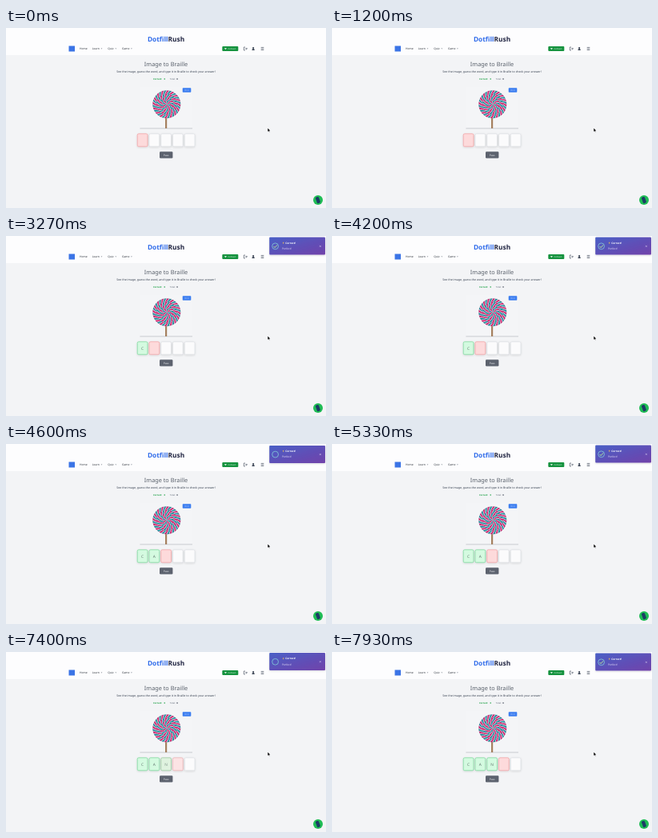
An HTML page for the animation above (8000 ms loop, 400 by 226 pixels).

```html
<!DOCTYPE html>
<html lang="en">
<head>
<meta charset="utf-8">
<title>Image to Braille</title>
<style>
  html, body { margin: 0; width: 100%; height: 100%; overflow: hidden; background: #f3f4f6; }
  svg { display: block; width: 100vw; height: 100vh; }
  text { font-family: "Noto Sans", "Open Sans", sans-serif; text-rendering: geometricPrecision; }
  .mid { text-anchor: middle; }
  .nav { font-size: 3.4px; font-weight: 500; fill: #30363f; }
  .line { fill: none; stroke: #374151; stroke-width: .6; }
</style>
</head>
<body>
<svg viewBox="0 0 400 226">
  <defs>
    <linearGradient id="violet" x1="0" y1="0" x2="1" y2="1">
      <stop offset="0" stop-color="#4a5fc6"/><stop offset="1" stop-color="#7142aa"/>
    </linearGradient>
    <linearGradient id="shade" x1="0" y1="0" x2="0" y2="1">
      <stop offset="0" stop-color="#c3c6cb"/><stop offset="1" stop-color="#f3f4f6"/>
    </linearGradient>
    <filter id="soft" x="-20%" y="-20%" width="140%" height="150%">
      <feDropShadow dx="0" dy=".8" stdDeviation=".8" flood-color="#111827" flood-opacity=".16"/>
    </filter>
  </defs>

  <rect width="400" height="226" fill="#f3f4f6"/>
  <rect width="400" height="34" fill="#fdfdfe"/>
  <text class="mid" x="200" y="16.8" font-size="8.3" font-weight="800" fill="#1f2340"><tspan fill="#2f6bea">Dotfill</tspan>Rush</text>

  <rect x="78.5" y="22.5" width="7.5" height="7" fill="#3b74e6"/>
  <g class="nav">
    <text x="92" y="27.2">Home</text><text x="107.8" y="27.2">Learn</text>
    <text x="127.3" y="27.2">Quiz</text><text x="145" y="27.2">Game</text>
  </g>
  <path d="M118.6 25.5h1.8l-.9 1zM136.4 25.5h1.8l-.9 1zM156 25.5h1.8l-.9 1z" fill="#6b7280"/>
  <rect x="270.3" y="23" width="20" height="6" rx="1" fill="#16933f"/>
  <path d="M272.8 25.2h3.2l-1.6 1.8z" fill="#fff"/>
  <text x="277.4" y="27.1" font-size="2.8" fill="#d5f2de">Contact</text>
  <path class="line" d="M299 24h-1.7v4h1.7M298.8 26h2.6M300.2 24.8l1.2 1.2l-1.2 1.2M318.7 24.4h3.6M318.7 26h3.6M318.7 27.6h3.6"/>
  <path d="M307.4 28.1q0-2 1.7-2t1.7 2z" fill="#374151"/>
  <circle cx="309.1" cy="25" r="1.1" fill="#374151"/>

  <text class="mid" x="200" y="47.6" font-size="7.3" fill="#5a616c">Image to Braille</text>
  <text class="mid" x="200" y="56.4" font-size="3.55" fill="#374151">See the image, guess the word, and type it in Braille to check your answer!</text>
  <g font-size="2.8" font-weight="600">
    <text x="184" y="65.2" fill="#22a34a">Correct:</text><text x="197.5" y="65.2" fill="#22a34a">0</text>
    <text x="204.8" y="65.2" font-weight="400" fill="#6b7280">Total:</text><text x="213.3" y="65.2" fill="#374151">0</text>
  </g>

  <rect x="167" y="74" width="66" height="52" rx="1" fill="#f4f5f7"/>
  <rect x="167.4" y="125.6" width="65.6" height="1.8" fill="url(#shade)"/>
  <rect x="199" y="110" width="2.2" height="16" fill="#a5805f"/>
  <g id="candy" transform="translate(200.8 95.8)"></g>
  <rect x="220.7" y="75.2" width="10.6" height="5.6" rx=".7" fill="#3b7df0"/>
  <text class="mid" x="226" y="79" font-size="2.7" fill="#c6daff">Hint</text>

  <g id="cells"></g>
  <rect x="192" y="155.3" width="16.4" height="8.2" rx="1.2" fill="#5c626e"/>
  <text class="mid" x="200.2" y="160.6" font-size="3.3" fill="#e8eaee">Pass</text>

  <circle cx="390" cy="216" r="6" fill="#1fbd55"/>
  <rect x="387.8" y="212" width="4.2" height="8" rx="1.4" fill="#1d3b66" transform="rotate(-20 390 216)"/>
  <path d="M327.2 126v4l1-.9l.7 1.5l.7-.3l-.7-1.5h1.3z" fill="#111"/>

  <g id="toast">
    <rect x="329.2" y="1.6" width="69.8" height="22" rx="1" fill="url(#violet)" filter="url(#soft)"/>
    <circle cx="336.6" cy="12.8" r="3.9" fill="none" stroke="#7fc0d6" stroke-width=".9"/>
    <path id="tick" d="M334.6 13l1.5 1.6l2.9-3.3" pathLength="1" fill="none" stroke="#b5e79a" stroke-width="1"/>
    <path d="M347.2 7.2l-1.6 1.6h1l-.6 1.4l1.8-1.8h-1z" fill="#f9c74f"/>
    <text x="349.3" y="9.8" font-size="3.2" font-weight="600" fill="#fff">Correct!</text>
    <text x="345" y="17.2" font-size="3.3" fill="#dcd8f4">Perfect!</text>
    <path d="M391.8 11.8l2 2m0-2l-2 2" stroke="#ddd6f3" stroke-width=".5"/>
  </g>
</svg>
<script>
const LOOP = 8000;
const HITS = [2470, 4270, 7400];   // a letter is accepted
const LEAD = 110;                  // motion already under way when a hit shows
const HIDE = 2010, HIDE_TIME = 100;
const WORD = "CAN";
const WHITE = [251, 251, 252, 214, 217, 222];   // fill rgb, border rgb
const PINK = [253, 218, 219, 240, 144, 146];
const GREEN = [212, 250, 224, 100, 208, 136];

const $ = id => document.getElementById(id);
const clamp = v => Math.max(0, Math.min(1, v));
const mix = (a, b, p) => a + (b - a) * p;

function add(parent, name, attrs) {
  const el = document.createElementNS("http://www.w3.org/2000/svg", name);
  for (const key in attrs) el.setAttribute(key, attrs[key]);
  return parent.appendChild(el);
}

// Coiled rope: rings of slanted stripes on white.
function drawCandy() {
  const radius = 17.4, rings = 4, colors = ["#d3266f", "#23929f"];
  const point = (r, a) => (r * Math.cos(a)).toFixed(2) + "," + (r * Math.sin(a)).toFixed(2);
  add($("candy"), "circle", { r: radius, fill: "#ece6ef" });
  for (let ring = 0; ring < rings; ring++) {
    const inner = radius * ring / rings, outer = radius * (ring + 1) / rings;
    const count = 8 + 8 * ring, step = 2 * Math.PI / count;
    const width = step * .72, slant = 3.4 / outer;
    for (let i = 0; i < count; i++) {
      const a = i * step + ring * .6;
      const pts = [point(inner, a), point(outer, a + slant),
        point(outer, a + slant + width), point(inner, a + width)];
      add($("candy"), "polygon", { points: pts.join(" "), fill: colors[i % 2] });
    }
    add($("candy"), "circle", {
      r: outer - .2, fill: "none", stroke: "#4b3a68", "stroke-width": .4, opacity: .5
    });
  }
}

const cells = Array.from({ length: 5 }, (_, i) => {
  const x = 164.2 + 14.75 * i;
  const box = add($("cells"), "rect", {
    x, y: 132.8, width: 12.8, height: 16, rx: 1.6, "stroke-width": .6, filter: "url(#soft)"
  });
  const letter = add($("cells"), "text", {
    x: x + 6.4, y: 142.5, class: "mid", "font-size": 4.8, fill: "#62766f"
  });
  letter.textContent = WORD[i] || "";
  return { box, letter };
});

function paintCells(t) {
  const done = HITS.map(h => t < h ? 0 : clamp((t - h + LEAD) / 150));
  cells.forEach(({ box, letter }, i) => {
    const active = i ? done[i - 1] || 0 : 1, solved = done[i] || 0;
    const c = WHITE.map((w, k) => mix(mix(w, PINK[k], active), GREEN[k], solved));
    box.setAttribute("fill", `rgb(${c.slice(0, 3)})`);
    box.setAttribute("stroke", `rgb(${c.slice(3)})`);
    letter.setAttribute("opacity", solved);
  });
}

function paintToast(t) {
  const hit = HITS.filter(h => h <= t).pop();
  const age = hit === undefined ? Infinity : t - hit + LEAD;
  const fade = 1 - clamp((age - HIDE) / HIDE_TIME);
  $("toast").setAttribute("opacity", fade);
  if (!fade) return;

  // drop in with a small bounce
  const offsets = [-1.6, 0, .8, 0];
  const pos = clamp(age / 500) * 3, k = Math.min(2, Math.floor(pos));
  const dy = mix(offsets[k], offsets[k + 1], pos - k);
  $("toast").setAttribute("transform", `translate(0 ${dy}) rotate(${1 - fade} 364 13)`);

  const drawn = clamp((age - 445) / 180);
  $("tick").setAttribute("stroke-dasharray", `${drawn} 2`);
  $("tick").setAttribute("opacity", drawn > 0 ? 1 : 0);
}

function frame(now) {
  const t = Math.max(0, now - start) % LOOP;
  paintCells(t);
  paintToast(t);
  requestAnimationFrame(frame);
}

drawCandy();
const start = performance.now();
frame(start);
</script>
</body>
</html>
```
